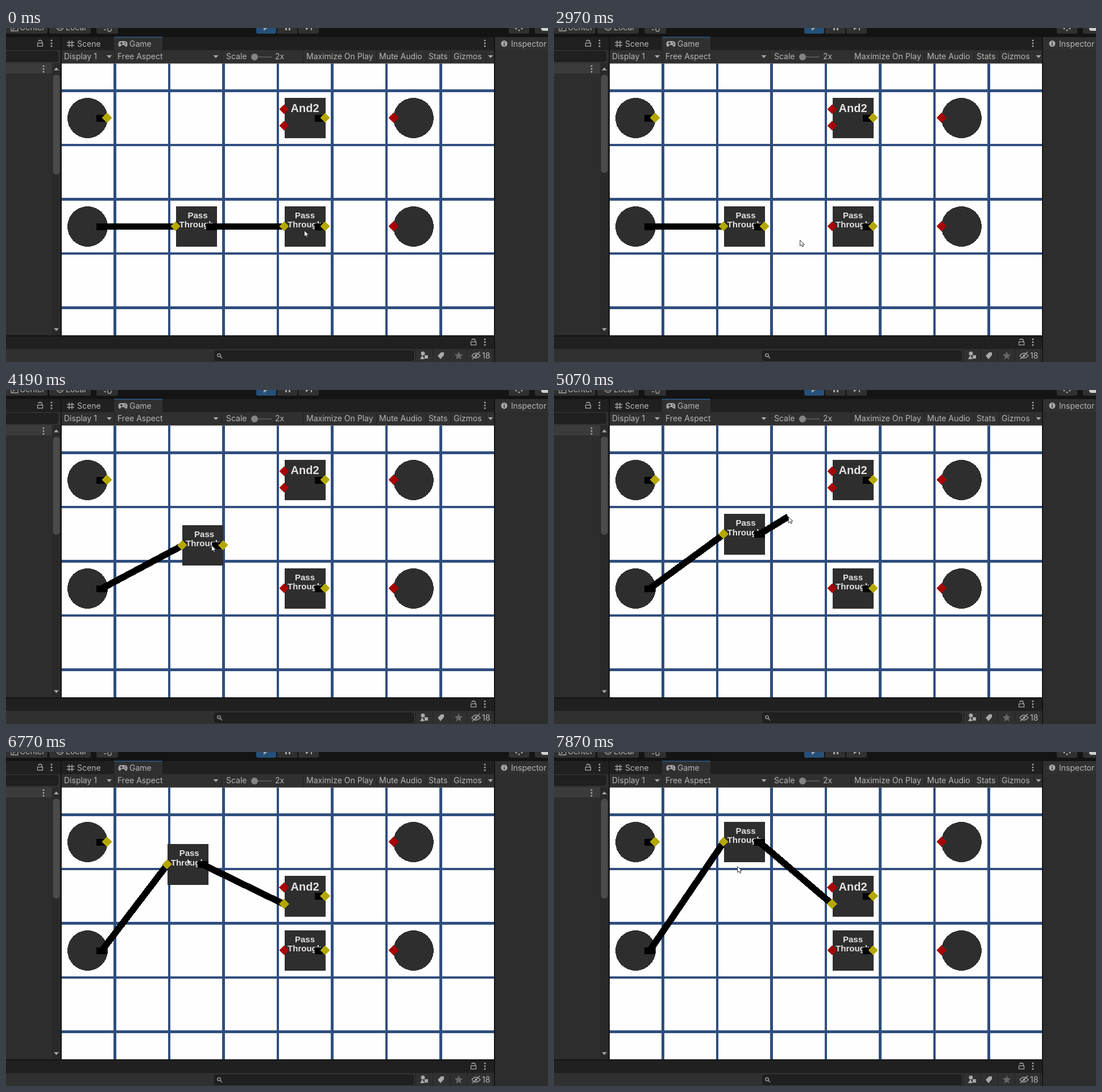
Recreate the animation shown at these times as an HTML page. Size 953 by 588 pixels, loop 7990 ms.

```html
<!DOCTYPE html>
<html lang="en">
<head>
<meta charset="utf-8">
<title>Logic board editor</title>
<style>
html, body { margin: 0; width: 100%; height: 100%; overflow: hidden; background: #141414; }
svg { display: block; width: 953px; height: 588px; }
text { font: 14px Inter, Roboto, sans-serif; fill: #b6b6b6; }
.node text { font: bold 15px "Liberation Sans", Arial, sans-serif; fill: #e2e2e2; text-anchor: middle; }
.node .big { font-size: 20px; }
.bar { fill: #303030; }
.panel { fill: #2d2d2d; }
.tabs { fill: #202020; }
.field { fill: #202020; stroke: #161616; }
.icon { fill: #a8a8a8; }
.line { fill: none; stroke: #a8a8a8; stroke-width: 1.3; }
.split { stroke: #222; }
.body { fill: #2e2e2e; }
.wire { stroke: #000; stroke-width: 11.6; }
#grid, #nodes, #wires, #ports { shape-rendering: crispEdges; }
</style>
</head>
<body>
<svg viewBox="0 0 953 588">
  <defs>
    <clipPath id="view"><rect x="98" y="62.5" width="760" height="478.5"/></clipPath>
    <g id="kebab" class="icon"><circle cy="-5" r="1.5"/><circle r="1.5"/><circle cy="5" r="1.5"/></g>
    <g id="lock" class="line"><rect x="-4.5" y="-.5" width="9" height="5.5"/><path d="M-3 -3a3 2.5 0 0 1 6 0V-1"/></g>
    <path id="down" class="icon" d="M-4.5 -2.5h9L0 2.5z"/>
  </defs>

  <!-- top toolbar -->
  <rect width="953" height="15" fill="#141414"/>
  <g fill="#303030">
    <rect y="-10" width="73" height="20" rx="3"/>
    <rect x="76" y="-10" width="73" height="20" rx="3"/>
    <rect x="159" y="-10" width="38" height="20" rx="3"/>
    <rect x="477" y="-10" width="35" height="20"/>
    <rect x="514" y="-10" width="36" height="20" rx="3"/>
    <rect x="884" y="-10" width="36" height="20" rx="3"/>
    <rect x="930" y="-10" width="40" height="20" rx="3"/>
  </g>
  <rect x="440" y="-10" width="35" height="20" rx="3" fill="#25507a"/>
  <path class="line" d="M9 -2V5H21V-2M12 3l6 -6M89 -2a6 6 0 0 0 12 0M92 0h7M172 3h4M179 -3v6a3 3 0 0 0 6 0v-2"/>
  <path class="icon" d="M453 -4v9l8 -6zM491 -3h3v7h-3zM497 -3h3v7h-3zM527 -4v8l7 -5zM536 -3h2v7h-2z"/>
  <text x="24" y="4">Center</text>
  <text x="105" y="4">Local</text>
  <g class="icon"><circle cx="897" cy="1" r="1.5"/><circle cx="902" cy="4" r="1.5"/><circle cx="907" cy="1" r="1.5"/></g>
  <path d="M941 0a4 4 0 0 0 4 5h8V0z" fill="#d0d0d0"/>

  <!-- left panel -->
  <rect class="panel" y="16" width="96" height="525"/>
  <rect class="tabs" y="16" width="96" height="23"/>
  <rect class="bar" y="39" width="96" height="23"/>
  <rect class="field" x="-5" y="41.5" width="96" height="17" rx="3"/>
  <rect y="62" width="81" height="18" fill="#3b3b3b"/>
  <rect x="81" y="62" width="15" height="479" fill="#292929"/>
  <use href="#lock" x="60" y="27"/><use href="#kebab" x="80" y="27"/><use href="#kebab" x="66" y="72"/>
  <path class="icon" d="M84 74.5h9l-4.5 -5z"/><use href="#down" x="88.5" y="531"/>
  <rect id="thumb" x="82.5" y="82" width="12" rx="6" fill="#4b4b4b"/>

  <!-- game panel -->
  <rect class="tabs" x="98" y="16" width="760" height="23"/>
  <rect class="bar" x="190" y="16" width="85" height="23"/>
  <rect x="190" y="15.5" width="85" height="1.5" fill="#2d5f8f"/>
  <rect class="bar" x="98" y="39" width="760" height="23"/>
  <path class="split" d="M190.5 39V62M379.5 39V62M522.5 39V62M651.5 39V62M738.5 39V62M782.5 39V62M843.5 39V62"/>
  <path class="line" d="M111 22v12M116 22v12M107 25.5h13M107 30.5h13"/>
  <path class="icon" d="M202 23h7a5 5 0 0 1 4.5 5c0 5 -2 6 -4 4l-2 -2h-4l-2 2c-2 2 -4 1 -4 -4a5 5 0 0 1 4.5 -5z"/>
  <path d="M200.5 27h5M203 24.5v5M208 25.5h2M209 28.5h2" stroke="#303030" stroke-width="1.5"/>
  <text x="125" y="33">Scene</text><text x="217" y="33">Game</text>
  <text x="102" y="55">Display 1</text><text x="196" y="55">Free Aspect</text>
  <text x="387" y="55">Scale</text><text x="473" y="55">2x</text>
  <text x="528" y="55">Maximize On Play</text><text x="656" y="55">Mute Audio</text>
  <text x="743" y="55">Stats</text><text x="787" y="55">Gizmos</text>
  <use href="#down" x="181.5" y="50.5"/><use href="#down" x="369" y="50.5"/><use href="#down" x="852" y="50.5"/>
  <path d="M437 51H467" stroke="#555" stroke-width="2"/><circle cx="437" cy="51" r="6" fill="#838383"/>
  <use href="#kebab" x="842" y="27"/>

  <!-- inspector -->
  <rect class="panel" x="860" y="16" width="93" height="572"/>
  <rect class="bar" x="860" y="16" width="93" height="23"/>
  <circle class="icon" cx="876" cy="27.5" r="5.5"/>
  <path d="M876 24v1.7M876 27v4" stroke="#303030" stroke-width="1.7"/>
  <text x="888" y="33">Inspector</text>

  <!-- bottom panel -->
  <rect class="tabs" y="543" width="858" height="22"/>
  <rect class="bar" y="565" width="858" height="23"/>
  <rect class="field" x="366.5" y="568.5" width="350" height="17" rx="3"/>
  <circle class="line" cx="374.5" cy="576" r="2.7"/><path class="line" d="M376.5 578l3.5 3.5"/>
  <path class="split" d="M720.5 565v23M750.5 565v23M780.5 565v23M810.5 565v23M855.5 565v23"/>
  <use href="#lock" x="822" y="553"/><use href="#kebab" x="842" y="553"/>
  <g class="icon">
    <circle cx="733" cy="573" r="3.5"/><path d="M728 583l4 -7l4 7zM736 576h6v6h-6z"/>
    <path d="M759 577l6 -6h5v5l-6 7z"/>
    <path d="M796 569.5l2.2 4.8l5 .5l-3.8 3.5l1.1 5l-4.5 -2.6l-4.5 2.6l1.1 -5l-3.8 -3.5l5 -.5z" fill="#666"/>
  </g>
  <path class="line" d="M819 577q7 -9 15 0q-8 8 -15 0M820 583L833 570"/><circle class="icon" cx="826.5" cy="577" r="2"/>
  <text x="837" y="582">18</text>

  <!-- board -->
  <g clip-path="url(#view)">
    <rect x="98" y="62" width="760" height="479" fill="#fefefe"/>
    <path id="grid" stroke="#2f4e7e" stroke-width="4.4"/>
    <g id="nodes"></g>
    <g id="wires"></g>
    <g id="ports" transform="translate(-.5 -.5)"></g>
    <path id="cursor" d="M.5 .5V11L3 8.8L4.8 12.3L6.5 11.5L4.9 8.1H8.2Z" fill="#fff" stroke="#222" stroke-width=".9"/>
  </g>
</svg>
<script>
const LOOP = 7990, TICK = 122, PHASE = 42;
const CELL = 95.5, HALF = 36, REACH = 20;
const YELLOW = "#b3a700", RED = "#a80404";
const $ = id => document.getElementById(id);
const cell = (col, row) => [143.5 + CELL * col, 158.5 + CELL * row];
const sum = (a, b) => [a[0] + b[0], a[1] + b[1]];
const diff = (a, b) => [a[0] - b[0], a[1] - b[1]];
const snap = ([x, y]) => cell(Math.round((x - 143.5) / CELL), Math.round((y - 158.5) / CELL));

// Pointer strokes, each following the one before; a held node or wire goes along
const START = [524, 356];
const strokes = [
  { until: 310, to: [529, 346] },
  { until: 840, to: [529, 346] },
  { until: 1450, to: [485, 351], bend: [515, 336] },
  { until: 1750, to: [473, 368] },
  { until: 2470, to: [488, 350] },
  { until: 2850, to: [445, 370], hold: "wire" },
  { until: 3710, to: [349.5, 348.5], bend: [399, 384] },
  { until: 4310, to: [364, 254], hold: "pass" },
  { until: 4820, to: [367, 252] },
  { until: 5430, to: [489, 173], hold: "wire" },
  { until: 5670, to: [509, 175] },
  { until: 6050, to: [514, 264], bend: [538, 272], hold: "and" },
  { until: 6530, to: [333, 243], bend: [420, 256] },
  { until: 7370, to: [332, 146], bend: [295, 117], hold: "pass" },
  { until: 7850, to: [322, 201] }
];

function curve(a, b, c, u) {
  return a.map((v, i) => (1 - u) ** 2 * v + 2 * u * (1 - u) * b[i] + u * u * c[i]);
}

const inputs = [
  { node: "last", at: [-HALF, 0] },
  { node: "and", at: [-HALF, -14.8] },
  { node: "and", at: [-HALF, 14.2] }
];

// Replays the strokes up to time t
function sceneAt(t) {
  const pos = { pass: cell(2, 2), last: cell(4, 2), and: cell(4, 0) };
  const portPos = p => sum(pos[p.node], p.at);
  let tip = START, since = 0, plug = inputs[0], pulling = false;

  for (const { until, to, bend, hold } of strokes) {
    if (t < since) break;
    const done = t >= until, from = tip;
    const u = Math.min(1, (t - since) / (until - since));
    tip = curve(from, bend || sum(from, diff(to, from).map(v => v / 2)), to, u);
    if (hold === "wire") {
      const near = p => Math.hypot(...diff(portPos(p), tip)) < REACH;
      plug = done ? inputs.find(near) : null;
      pulling = !done;
    } else if (hold) {
      const moved = sum(pos[hold], diff(tip, from));
      pos[hold] = done ? snap(moved) : moved;
    }
    since = until;
  }
  return { pos, tip, plug, end: plug ? portPos(plug) : pulling ? tip : null };
}

function add(parent, tag, attrs, label) {
  const el = document.createElementNS("http://www.w3.org/2000/svg", tag);
  for (const key in attrs) el.setAttribute(key, attrs[key]);
  if (label) el.textContent = label;
  $(parent)?.appendChild(el);
  return el;
}

const move = (el, [x, y]) => el.setAttribute("transform", `translate(${x} ${y})`);
const show = (el, on) => { el.style.display = on ? "" : "none"; };

function node(at, shape, stubX, rows = []) {
  const g = add("nodes", "g", { class: "node" });
  g.append(shape);
  for (const [label, x, y, cls = ""] of rows) g.append(add("", "text", { x, y, class: cls }, label));
  if (stubX) g.append(add("", "rect", { x: stubX, y: -6, width: 19, height: 12 }));
  move(g, at);
  return g;
}
const disc = (at, stubX) => node(at, add("", "circle", { class: "body", r: 35.5 }), stubX);
const block = (at, rows) =>
  node(at, add("", "rect", { class: "body", x: -HALF, y: -HALF, width: 72, height: 71.5 }), 17, rows);

function port(at, fill) {
  const el = add("ports", "path", { d: "M0 -8.8L8.8 0L0 8.8L-8.8 0Z", fill });
  move(el, at);
  return el;
}

function stretch(line, [x1, y1], [x2, y2]) {
  Object.entries({ x1, y1, x2, y2 }).forEach(([k, v]) => line.setAttribute(k, v));
}

let lines = "";
for (let i = 0; i < 7; i++) lines += `M${191.4 + CELL * i} 62V541M98 ${110.5 + CELL * i}H858`;
$("grid").setAttribute("d", lines);

for (const row of [0, 2]) {
  disc(cell(0, row), 15.5);
  disc(cell(6, row));
  port(sum(cell(6, row), [-34.5, 0]), RED);
}
port(sum(cell(0, 0), [34.5, 0]), YELLOW);

const home = sceneAt(0).pos;
const nodes = {
  last: block(home.last, [["Pass", 0, -15], ["Through", 0, 1.5]]),
  pass: block(home.pass, [["Pass", 2.5, -15], ["Through", 0.5, 1.5]]),
  and: block(home.and, [["And2", 0, -10.5, "big"]])
};
const feed = add("wires", "line", { class: "wire" });
const link = add("wires", "line", { class: "wire" });
for (const p of inputs) p.el = port([0, 0], RED);
const passIn = port([0, 0], YELLOW);
const outs = Object.keys(nodes).map(name => ({ name, el: port([0, 0], YELLOW) }));

function draw(time) {
  const t = Math.max(0, Math.floor((time - PHASE) / TICK) * TICK + PHASE);
  const { pos, tip, plug, end } = sceneAt(t);

  move($("cursor"), tip);
  for (const name in nodes) move(nodes[name], pos[name]);
  for (const p of inputs) {
    move(p.el, sum(pos[p.node], p.at));
    p.el.setAttribute("fill", p === plug ? YELLOW : RED);
  }
  for (const { name, el } of outs) {
    move(el, sum(pos[name], [HALF, 0]));
    show(el, name !== "pass" || !end);
  }
  const entry = sum(pos.pass, [-HALF, 0]);
  move(passIn, entry);
  stretch(feed, sum(cell(0, 2), [25, 0]), entry);
  show(link, end);
  if (end) stretch(link, sum(pos.pass, [26.5, 0]), end);
  $("thumb").setAttribute("height", plug ? 176 : 173);
}

const start = performance.now();
function frame() {
  draw((performance.now() - start) % LOOP);
  requestAnimationFrame(frame);
}
frame();
</script>
</body>
</html>
```
